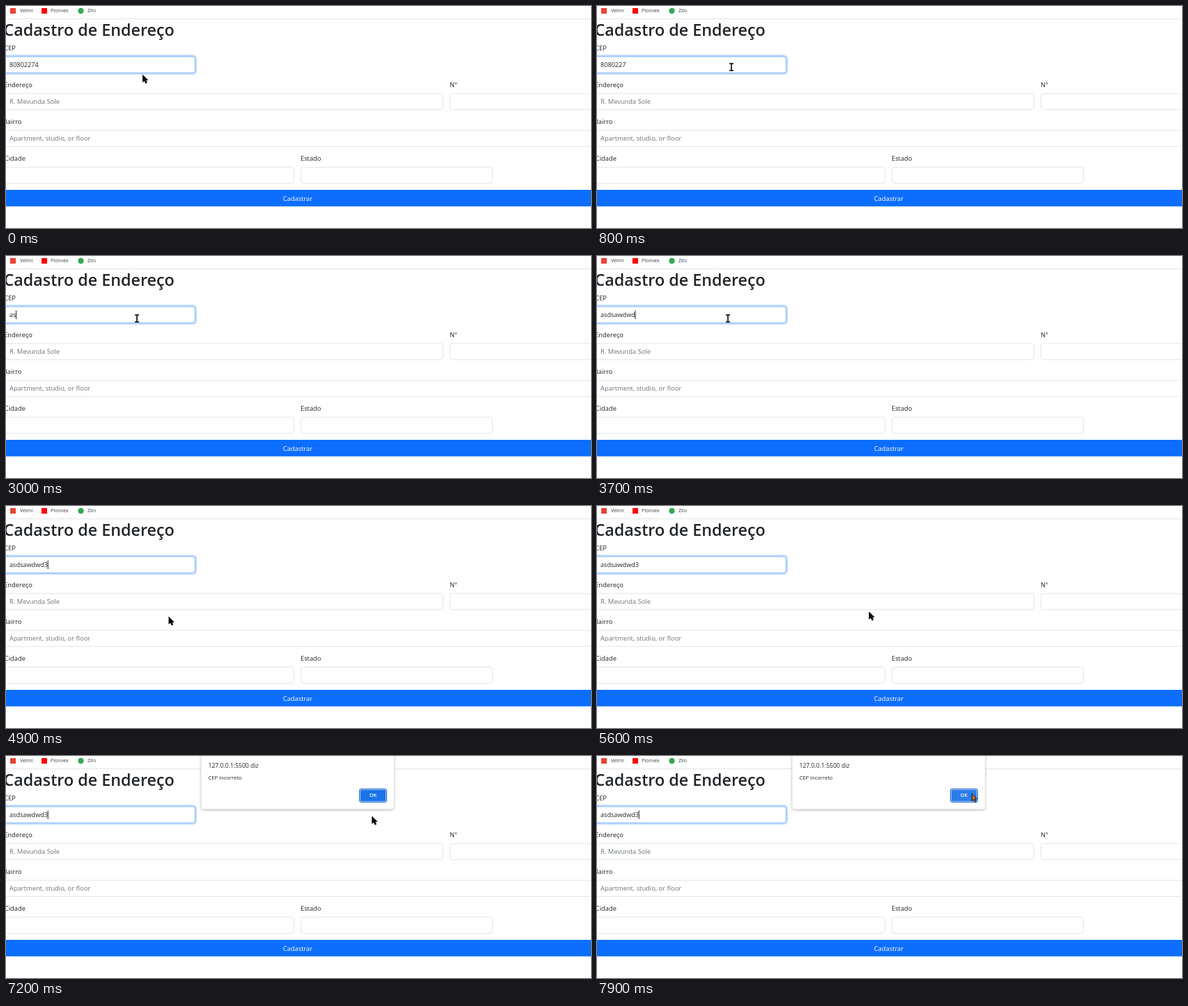
These frames come from a looping animation (840x320 px, 8000 ms). An HTML page:

```html
<!DOCTYPE html>
<html lang="pt-BR">
<head>
<meta charset="utf-8">
<title>Cadastro de Endereço</title>
<style>
  html, body { margin: 0; width: 100%; height: 100%; overflow: hidden; background: #fff; }
  svg { display: block; width: 840px; height: 320px; font: 9.35px "Open Sans", "Noto Sans", sans-serif; fill: #212529; }
  .bookmarks { font-size: 7.1px; fill: #3c4043; }
  .title { font-size: 23.3px; font-weight: 600; }
  .end { text-anchor: end; }
  .mid { text-anchor: middle; }
  .field { fill: #fff; stroke: #e2e5e9; }
  .ring { fill: none; stroke: #c2dbfe; stroke-width: 2.6; }
  .focus { fill: #fff; stroke: #86b7fe; }
  .hint { fill: #6c757d; }
  #cep { font-size: 9.15px; }
  #dialog { filter: drop-shadow(0 1px 2px rgba(0, 0, 0, .3)); }
</style>
</head>
<body>
<svg viewBox="0 0 840 320">
  <g class="bookmarks">
    <rect x="6" y="3" width="8" height="8" fill="#ea4335"/>
    <rect x="51" y="3" width="8" height="8" fill="#f00"/>
    <circle cx="107.5" cy="7" r="4.2" fill="#34a853"/>
    <text x="20" y="9.4">Velmi</text>
    <text x="64" y="9.4">Plonvex</text>
    <text x="117" y="9.4">Zilo</text>
  </g>
  <path d="M0 18.5H840" stroke="#e3e5e8"/>
  <text class="title end" x="241.7" y="43">Cadastro de Endereço</text>

  <g id="form"></g>
  <text id="cep" x="5" y="88.3"></text>
  <path id="caret" stroke="#212529" d="M0 78.5V91"/>

  <rect y="265" width="840" height="23.8" fill="#0d6efd"/>
  <text class="mid" x="418.9" y="281.3" fill="#fff">Cadastrar</text>

  <g id="dialog">
    <rect x="280.5" y="-10" width="276.5" height="86.5" rx="3" fill="#fff"/>
    <text x="290.5" y="16.5" font-size="8.6">127.0.0.1:5500 diz</text>
    <text x="290.5" y="34" font-size="7.6">CEP incorreto</text>
    <rect x="507.5" y="47.5" width="39" height="19" rx="2.5" fill="#a9c9f7" stroke="#1a66cf"/>
    <rect id="ok" x="509" y="49" width="36" height="16" rx="1.5"/>
    <text class="mid" x="527" y="59.4" font-size="7.2" font-weight="600" fill="#fff">OK</text>
  </g>

  <path id="arrow" stroke="#000" stroke-width=".8" stroke-linejoin="round" d="M.4.5V10.6L2.7 8.5 4.5 12.4 6.3 11.6 4.6 7.8H7.6Z"/>
  <path id="beam" fill="none" stroke="#000" stroke-width="1.6" d="M-3-5H3M0-5V5M-3 5H3"/>
</svg>
<script>
const LOOP = 8000, STEP = 100, DIALOG_AT = 5900;
const $ = id => document.getElementById(id);
const show = (el, on) => el.setAttribute("visibility", on ? "visible" : "hidden");
const inside = (x, y, b) => x > b.left && x < b.right && y > b.top && y < b.bottom;

const ROW = 53.1;
const field = (row, left, right, label, labelX, hint = "") =>
  ({ row, left, right, label, labelX, hint, top: 73 + row * ROW, bottom: 96.3 + row * ROW });
const fields = [
  field(0, -10, 271.5, "CEP", 14),
  field(1, -10, 627.5, "Endereço", 38, "R. Mevunda Sole"),
  field(1, 637.5, 840.5, "N°", 648),
  field(2, -10, 840.5, "Bairro", 22.5, "Apartment, studio, or floor"),
  field(3, -10, 413.5, "Cidade", 28),
  field(3, 423.5, 698.5, "Estado", 452.5)
];
const okButton = { left: 507, right: 547, top: 47, bottom: 67 };

const box = (f, name, grow = 0) =>
  `<rect class="${name}" x="${f.left - grow}" y="${f.top - grow}" rx="${3.5 + grow}"
    width="${f.right - f.left + 2 * grow}" height="${f.bottom - f.top + 2 * grow}"/>`;
$("form").innerHTML = fields.map(f =>
  (f.row ? box(f, "field") : box(f, "ring", 1.4) + box(f, "focus")) +
  `<text class="end" x="${f.labelX}" y="${f.top - 8.9}">${f.label}</text>
   <text class="hint" x="5" y="${f.top + 15.2}">${f.hint}</text>`).join("");

// Pointer moves: each eases out along a curve, bent when a control point is given.
const origin = [196, 99];
const moves = [
  { from: 0, to: 800, end: [193, 88] },
  { from: 1900, to: 2000, end: [188, 90] },
  { from: 4200, to: 4400, end: [217, 104] },
  { from: 4800, to: 6200, end: [431, 113], bend: [254, 300] },
  { from: 6500, to: 6900, end: [455, 106] },
  { from: 7000, to: 7900, end: [538, 54], bend: [560, 90] }
];
function pointerAt(t) {
  let at = origin;
  for (const { from, to, end, bend } of moves) {
    if (t < from) break;
    const v = (1 - Math.min(1, (t - from) / (to - from))) ** 2.5, u = 1 - v;
    at = at.map((a, i) => {
      const c = bend ? bend[i] : (a + end[i]) / 2;
      return v * v * a + 2 * u * v * c + u * u * end[i];
    });
  }
  return at;
}

// Backspace is tapped once, then held; later a first key, a quick burst and one last key.
function cepAt(t) {
  if (t < 500) return "80802274";
  if (t < 2500) return "8080227".slice(0, Math.max(0, 7 - Math.max(0, t - 800) / 25));
  const typed = t < 3000 ? 1 : t < 4300 ? Math.min(9, 2 + (t - 3000) / 100) : 10;
  return "asdsawdwd3".slice(0, typed);
}

function draw(now) {
  const t = Math.floor(now % LOOP / STEP) * STEP;
  const [x, y] = pointerAt(t);
  const open = t >= DIALOG_AT;
  const overOk = open && inside(x, y, okButton);
  const overText = !open && fields.some(f => inside(x, y, f));

  $("cep").textContent = cepAt(t);
  $("caret").setAttribute("transform", `translate(${5.2 + $("cep").getComputedTextLength()})`);
  show($("caret"), open || t > 2000 && t < 5000);

  show($("dialog"), open);
  $("ok").setAttribute("fill", overOk ? "#2b7de9" : "#1a73e8");

  show($("beam"), overText);
  show($("arrow"), !overText);
  $("arrow").setAttribute("fill", overOk ? "#c8741c" : "#000");
  for (const id of ["beam", "arrow"]) $(id).setAttribute("transform", `translate(${x} ${y})`);
}

const start = performance.now();
function tick() {
  draw(performance.now() - start);
  requestAnimationFrame(tick);
}
tick();
</script>
</body>
</html>
```
